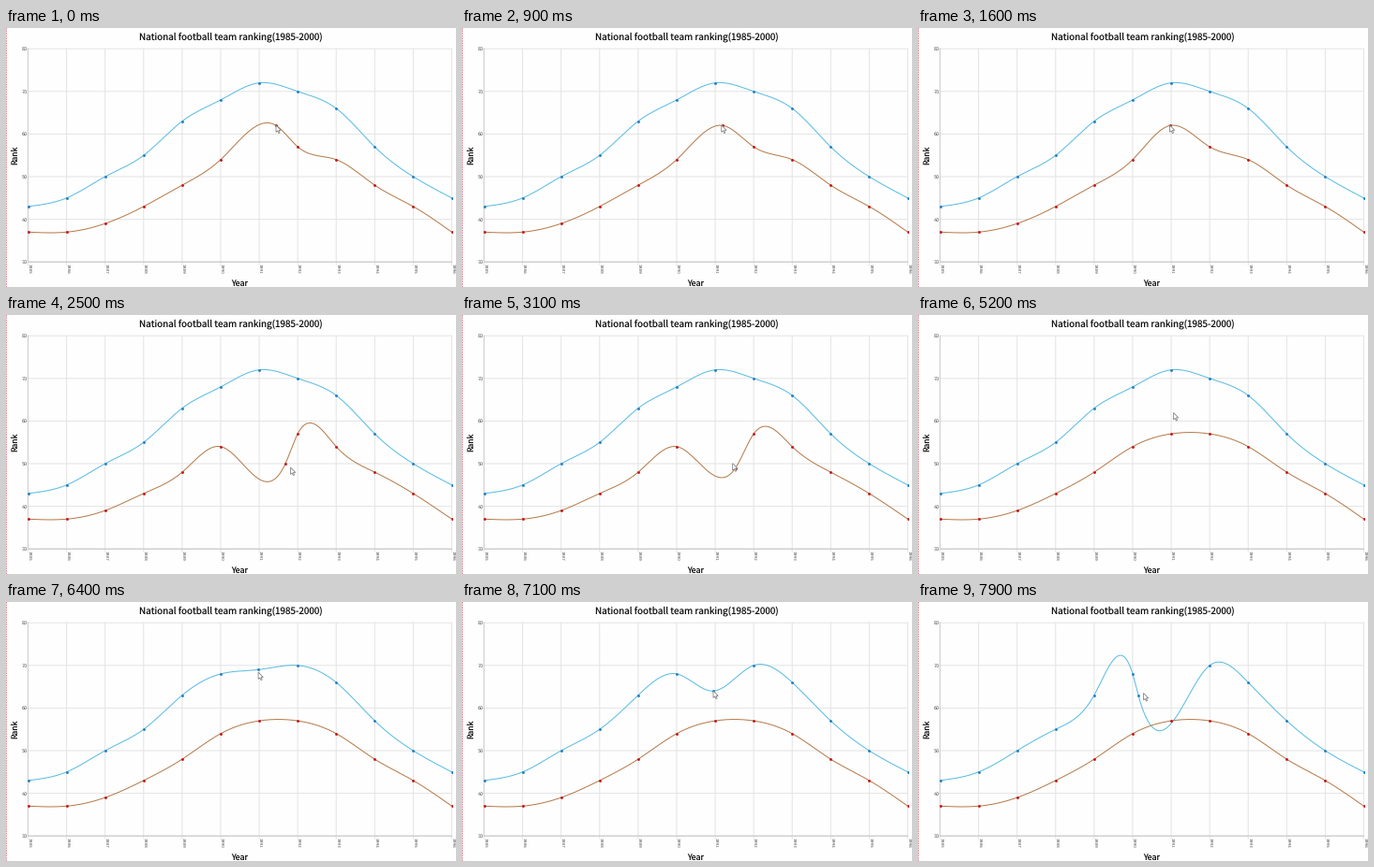
These frames come from a looping animation (480 px wide and 277 px high, 8000 ms). A matplotlib script:

```python
import numpy as np
import matplotlib.pyplot as plt
from matplotlib.animation import FuncAnimation
from matplotlib.patches import Polygon, Rectangle

W, H, DPI = 480, 277, 64
PX = 72 / DPI  # points per pixel
LEFT, RIGHT, TOP, BOTTOM = 23.5, 475.5, 22.2, 250.2
UNIT = (BOTTOM - TOP) / 50
FRAMES, STEP = 80, 100
LAG = 0.1  # a dragged dot trails the pointer, in seconds
DRAGGED = 6

plt.rcParams["font.family"] = "Noto Sans CJK JP"
plt.rcParams["text.hinting"] = "none"

years = np.arange(1985, 1997)
year_x = np.linspace(LEFT, RIGHT, len(years))
upper = np.array([43, 45, 50, 55, 63, 68, 72, 70, 66, 57, 50, 45])
lower = np.array([37, 37, 39, 43, 48, 54, 57, 57, 54, 48, 43, 37])

# Pointer stops: seconds, x, y
stops = np.array([
    (0, 288, 104), (1.6, 268.5, 104), (2.4, 298, 158.8), (2.5, 303.5, 163),
    (4, 264, 151.5), (4.7, 270, 127), (5.2, 272.5, 104.5), (5.8, 270, 58.6),
    (7.1, 268, 95), (7.8, 235, 99.5), (7.9, 240.5, 97.5)])
arrow = np.array([(0, 0), (0, 7.4), (1.7, 5.9), (2.9, 8.5),
                  (4.1, 8), (2.9, 5.4), (5.3, 5.4)])


def value_y(v):
    return BOTTOM - (v - 30) * UNIT


def pointer_at(t):
    """Pointer position, gently eased between its stops."""
    times = stops[:, 0]
    s = np.interp(t, times, np.arange(len(times)))
    i, u = int(s), s % 1
    u = (u + u * u * (3 - 2 * u)) / 2
    j = min(i + 1, len(stops) - 1)
    return stops[i, 1:] + (stops[j, 1:] - stops[i, 1:]) * u


def spline(x, y, samples):
    """Natural cubic spline through the points."""
    n = len(x)
    h = np.diff(x)
    slope = np.diff(y) / h
    A, r = np.eye(n), np.zeros(n)
    for i in range(1, n - 1):
        A[i, i - 1:i + 2] = h[i - 1], 2 * (h[i - 1] + h[i]), h[i]
        r[i] = 6 * (slope[i] - slope[i - 1])
    m = np.linalg.solve(A, r)
    k = np.clip(np.searchsorted(x, samples) - 1, 0, n - 2)
    d = samples - x[k]
    return (y[k] + d * (slope[k] - h[k] * (2 * m[k] + m[k + 1]) / 6)
            + m[k] * d**2 / 2 + (m[k + 1] - m[k]) * d**3 / (6 * h[k]))


fig = plt.figure(figsize=(W / DPI, H / DPI), dpi=DPI, facecolor="#fefefe")
ax = fig.add_axes([0, 0, 1, 1])
ax.set(xlim=(0, W), ylim=(H, 0))
ax.axis("off")


def rule(xs, ys, color, width=1, **kw):
    return ax.plot(xs, ys, color=color, lw=width * PX, snap=False, **kw)[0]


def label(x, y, text, size, color="#111111", ha="center", va="baseline", **kw):
    ax.text(x, y, text, fontsize=size * PX, color=color, ha=ha, va=va, **kw)


tick = dict(color="#555555", family="DejaVu Sans")
rule([0.5, 0.5], [0, H], "#e08a9a", dashes=(1.6, 1))

for v in range(30, 81, 10):
    y = value_y(v)
    rule([LEFT - 2, RIGHT], [y, y], "#e4e4e4")
    label(22.8, y, str(v), 5, ha="right", va="center_baseline", **tick)
for x, year in zip(year_x, years):
    rule([x, x], [TOP, BOTTOM + 3], "#e4e4e4")
    label(x, 257.3, str(year), 4.3, va="center", rotation=270, **tick)
rule([LEFT, RIGHT], [BOTTOM, BOTTOM], "#c4c4c4")
rule([LEFT, LEFT], [TOP, BOTTOM], "#cccccc")

label(240, 12.4, "National football team ranking(1985-2000)", 9.9)
label(249.5, 275.6, "Year", 8.8)
label(14.5, 135.5, "Rank", 8.6, ha="right", va="center", rotation=90)

plot_box = Rectangle((LEFT - 0.5, TOP), RIGHT - LEFT + 1, BOTTOM - TOP,
                     transform=ax.transData)
samples = np.linspace(LEFT, RIGHT, 700)


class Series:
    def __init__(self, values, line_color, dot_color, start, end):
        self.values, self.start, self.end = values, start, end
        self.line = rule([], [], line_color, zorder=3)
        self.dots = rule([], [], dot_color, ls="", marker="o", ms=2.9 * PX,
                         mew=0, zorder=4)
        for art in (self.line, self.dots):
            art.set_clip_path(plot_box)

    def update(self, t):
        """Move the dragged dot with the pointer, at whole values only."""
        x, y = pointer_at(np.clip(t - LAG, self.start, self.end))
        xs, vs = year_x.copy(), self.values.copy()
        xs[DRAGGED] = x
        vs[DRAGGED] = np.floor(30 + (BOTTOM - y) / UNIT)
        ys = value_y(vs)
        self.line.set_data(samples, spline(xs, ys, samples))
        self.dots.set_data(xs, ys)


series = [Series(upper, "#58bbe2", "#2480c4", 5.8, 8),
          Series(lower, "#b57a48", "#c4161c", 0, 4.7)]
pointer = Polygon(arrow, closed=True, fc="white", ec="#808080",
                  lw=0.8 * PX, zorder=6)
ax.add_patch(pointer)


def draw(frame):
    t = frame * STEP / 1000
    for s in series:
        s.update(t)
    pointer.set_xy(arrow + pointer_at(t))
    return []


anim = FuncAnimation(fig, draw, frames=FRAMES, interval=STEP, repeat=True,
                     repeat_delay=0, blit=False)
plt.show()
```
